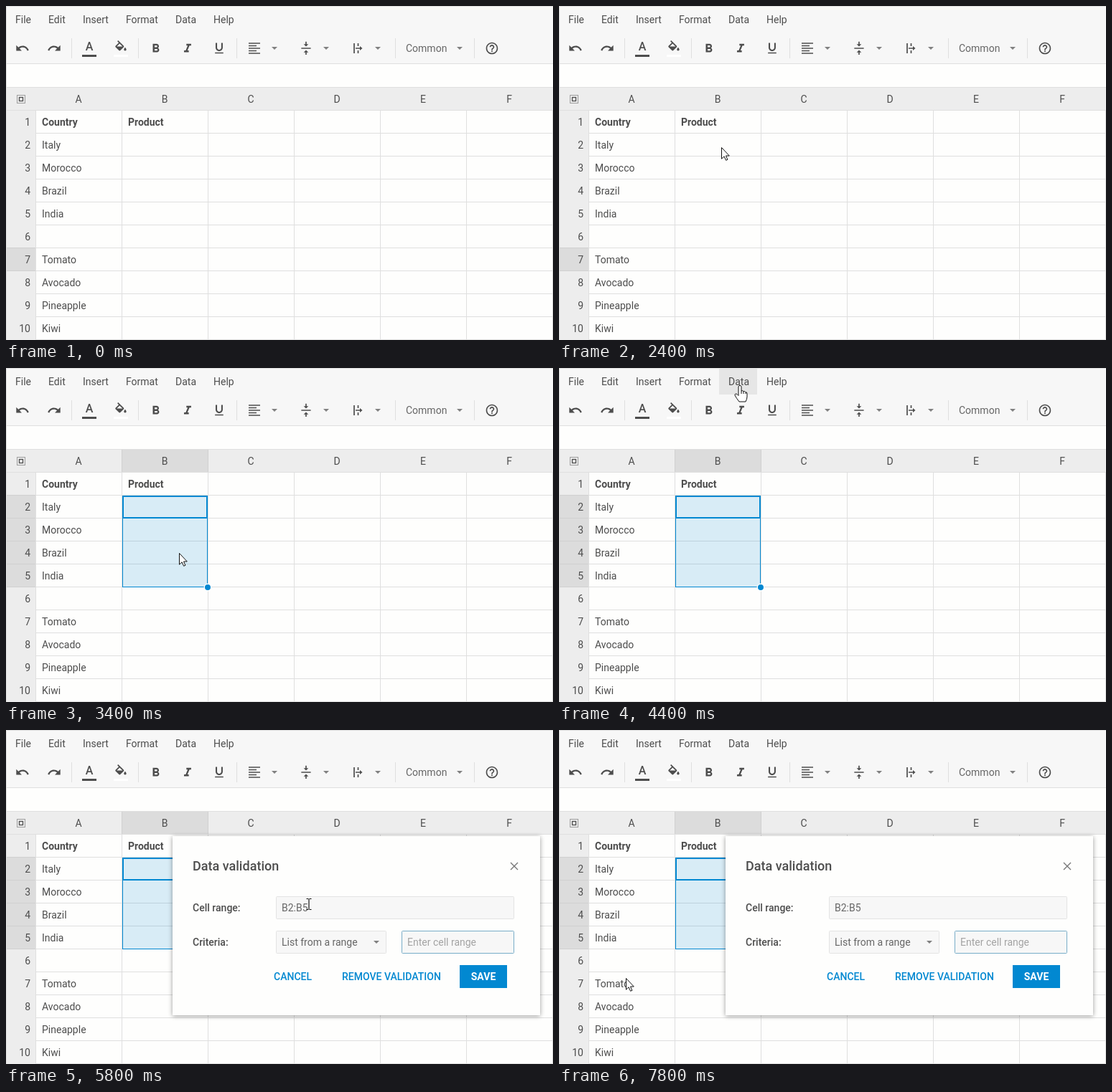
These frames come from a looping animation (762 by 466 pixels, 8 s). An HTML page:

```html
<!DOCTYPE html>
<html lang="en">
<head>
<meta charset="utf-8">
<title>Spreadsheet data validation</title>
<style>
  html, body { margin: 0; width: 100%; height: 100%; overflow: hidden; background: #fefefd; }
  svg { display: block; width: 762px; height: 466px; font: 14px Roboto, sans-serif; fill: #4d4d4d; }
  .medium { font-weight: 500; }
  .bold { font-weight: 700; }
  .blue { fill: #0288d1; }
  .field { fill: #f7f7f7; stroke: #e3e3e3; }
  .line { fill: none; stroke: #dfdfdf; }
  .edge { fill: none; stroke: #0288d1; }
  .pointer { fill: #fff; stroke: #111; stroke-linejoin: round; }
</style>
</head>
<body>
<svg viewBox="0 0 762 466">
  <rect width="762" height="81" fill="#f7f7f7"/>
  <rect id="menuHover" x="223" y="1" width="53" height="36" fill="#e6e6e6"/>
  <g id="menu"></g>

  <g id="toolbar">
    <path class="line" d="M91.5 45v28M184.5 45v28M321.5 45v28M542.5 45v28M652.5 45v28"/>
    <path id="undo" transform="translate(12.6 48.8) scale(.85)" d="M12.5 8c-2.65 0-5.05.99-6.9 2.6L2 7v9h9l-3.62-3.62c1.39-1.16 3.16-1.88 5.12-1.88 3.54 0 6.55 2.31 7.6 5.5l2.37-.78C21.08 11.03 17.15 8 12.5 8z"/>
    <use href="#undo" transform="translate(90 0) scale(-1 1)"/>
    <text class="medium" x="116" y="62" font-size="16" text-anchor="middle">A</text>
    <rect x="106" y="68" width="20" height="3"/>
    <path transform="translate(149.8 48) scale(.85)" d="M16.56 8.94L7.62 0 6.21 1.41l2.38 2.38-5.15 5.15c-.59.59-.59 1.54 0 2.12l5.5 5.5c.29.29.68.44 1.06.44s.77-.15 1.06-.44l5.5-5.5c.59-.58.59-1.53 0-2.12zM5.21 10L10 5.21 14.79 10H5.21zM19 11.5s-2 2.17-2 3.5c0 1.1.9 2 2 2s2-.9 2-2c0-1.33-2-3.5-2-3.5z"/>
    <rect x="150" y="68" width="20" height="3" fill="#fff"/>
    <path transform="translate(198.7 49.5) scale(.83)" d="M15.6 10.79c.97-.67 1.65-1.77 1.65-2.79 0-2.26-1.75-4-4-4H7v14h7.04c2.09 0 3.71-1.7 3.71-3.79 0-1.52-.86-2.82-2.15-3.42zM10 6.5h3c.83 0 1.5.67 1.5 1.5s-.67 1.5-1.5 1.5h-3v-3zm3.5 9H10v-3h3.5c.83 0 1.5.67 1.5 1.5s-.67 1.5-1.5 1.5z"/>
    <path transform="translate(243 49.5) scale(.83)" d="M10 4v3h2.21l-3.42 8H6v3h8v-3h-2.21l3.42-8H18V4z"/>
    <path transform="translate(287 48.9) scale(.83)" d="M12 17c3.31 0 6-2.69 6-6V3h-2.5v8c0 1.93-1.57 3.5-3.5 3.5S8.5 12.93 8.5 11V3H6v8c0 3.31 2.69 6 6 6zm-7 2v2h14v-2H5z"/>
    <path d="M338 52h16M338 55.5h11M338 59h16M338 62.5h11M338 66h16" stroke="#4d4d4d" stroke-width="1.6"/>
    <path transform="translate(408 49) scale(.83)" d="M8 19h3v4h2v-4h3l-4-4-4 4zm8-14h-3V1h-2v4H8l4 4 4-4zM4 11v2h16v-2H4z"/>
    <path d="M485 52v14M490.5 52v4M490.5 62v4M487 59h7" stroke="#4d4d4d" stroke-width="1.7"/>
    <path d="M493 56l3.5 3-3.5 3z"/>
    <text x="557" y="64" fill="#666">Common</text>
    <path transform="translate(667 49) scale(.83)" d="M11 18h2v-2h-2v2zm1-16C6.48 2 2 6.48 2 12s4.48 10 10 10 10-4.48 10-10S17.52 2 12 2zm0 18c-4.41 0-8-3.59-8-8s3.59-8 8-8 8 3.59 8 8-3.59 8-8 8zm0-14c-2.21 0-4 1.79-4 4h2c0-1.1.9-2 2-2s2 .9 2 2c0 2-3 1.75-3 5h2c0-2.25 3-2.5 3-5 0-2.21-1.79-4-4-4z"/>
  </g>

  <path d="M0 113h762v33H42v320H0z" fill="#ededed"/>
  <g id="headerMarks" fill="#dcdcdc" stroke="#d0d0d0"></g>
  <path id="grid" class="line"/>
  <g fill="none" stroke="#4d4d4d">
    <rect x="15.5" y="124.5" width="11" height="11" stroke-dasharray="1 1"/>
    <rect x="18.5" y="127.5" width="5" height="5" stroke-width="1.3"/>
  </g>

  <g id="selection">
    <rect id="range" class="edge" x="162.5" y="178.5" width="118" style="fill:#0288d1;fill-opacity:.15"/>
    <rect class="edge" x="163" y="179" width="117" height="30" stroke-width="2"/>
    <circle id="handle" class="blue" cx="281" r="4.7" stroke="#fff" stroke-width="1.4"/>
  </g>
  <g id="cells"></g>

  <g id="dialog">
    <rect x="232" y="148" width="512" height="250" fill="#fefefd" style="filter:drop-shadow(0 1px 3px rgba(0,0,0,.4))"/>
    <text class="medium" x="260" y="196" font-size="18">Data validation</text>
    <path d="M703 185l10 10M713 185l-10 10" stroke="#777" stroke-width="1.4"/>
    <text class="medium" x="260" y="253">Cell range:</text>
    <rect class="field" x="376.5" y="232.5" width="331" height="31" rx="1"/>
    <text x="384" y="253" fill="#666">B2:B5</text>
    <text class="medium" x="260" y="301">Criteria:</text>
    <rect class="field" x="376.5" y="280.5" width="153" height="31" rx="1"/>
    <text x="384" y="301" fill="#666">List from a range</text>
    <rect x="551.5" y="280.5" width="156" height="31" rx="1" fill="#f7f7f7" stroke="#78adc8"/>
    <text x="559" y="301" fill="#a3a3a3">Enter cell range</text>
    <text class="medium blue" x="373" y="349">CANCEL</text>
    <text class="medium blue" x="468" y="349">REMOVE VALIDATION</text>
    <rect class="blue" x="632" y="328" width="66" height="32"/>
    <text class="bold" x="665" y="349" text-anchor="middle" fill="#fff">SAVE</text>
  </g>
  <g id="carets" fill="#808080"></g>

  <g id="cursor">
    <path id="arrow" class="pointer" d="M.5.5v15.7l3.6-3.4 2.5 5.5 2.3-1-2.4-5.3h4.8z"/>
    <path id="hand" class="pointer" d="M-2 1.5Q0-1 2 1.5V8Q4 6.8 5 8.7Q7 7.7 8 9.8Q10 9.3 10 12V16Q10 19 8 23H-1Q-5 18-7 14Q-7 11-4 12.5L-2 14.5ZM2 8v4M5 9v3M8 10v2"/>
    <path id="beam" fill="none" stroke="#111" stroke-width="1.2" d="M-3.5-7.5h3M.5-7.5h3M0-7V7M-3.5 7.5h3M.5 7.5h3"/>
  </g>
</svg>

<script>
const LOOP = 8000, STEP = 200;
const SELECT_AT = 2600, DIALOG_AT = 5200;
const $ = id => document.getElementById(id);
const label = (x, y, text, attrs = '') => `<text x="${x}" y="${y}" ${attrs}>${text}</text>`;
const show = (id, visible) => $(id).style.display = visible ? '' : 'none';

$('menu').innerHTML = [['File', 13], ['Edit', 59], ['Insert', 107], ['Format', 167], ['Data', 236], ['Help', 289]]
  .map(([text, x]) => label(x, 24, text)).join('');

const caret = (x, y) => `<path d="M${x - 4} ${y}h8l-4 4z"/>`;
$('toolbar').innerHTML += `<g fill="#808080">${[374, 446, 518, 632].map(x => caret(x, 57)).join('')}</g>`;
$('carets').innerHTML = caret(516, 294);

let lines = 'M.5 466V.5H762M0 80.5H762M0 113.5H762M0 145.5H762';
for (let i = 0; i < 7; i++) lines += `M${41.5 + 120 * i} 145V466`;
for (let i = 1; i <= 10; i++) lines += `M41 ${145.5 + 32 * i}H762`;
$('grid').setAttribute('d', lines);

const firstColumn = ['Country', 'Italy', 'Morocco', 'Brazil', 'India', '', 'Tomato', 'Avocado', 'Pineapple', 'Kiwi'];
$('cells').innerHTML =
  [...'ABCDEF'].map((letter, i) => label(101 + 120 * i, 135, letter, 'text-anchor="middle"')).join('') +
  firstColumn.map((text, i) => {
    const y = 167 + 32 * i;
    return label(34, y, i + 1, 'text-anchor="end"') + label(50, y, text, i ? '' : 'class="bold"');
  }).join('') + label(170, 167, 'Product', 'class="bold"');

// time, x, y
const path = [
  [1400, 66, 440], [1600, 75, 371], [2000, 150, 272], [2400, 226, 197], [2600, 232, 194],
  [2800, 241, 279], [3000, 241, 285], [3400, 241, 258], [3600, 241, 240], [4000, 252, 23],
  [4800, 252, 25], [5000, 259, 52], [5200, 290, 95], [5800, 422, 243],
  [6200, 600, 297], [6800, 600, 297], [7400, 200, 335], [7800, 93, 346]
];

function cursorAt(t) {
  const next = path.findIndex(p => p[0] > t);
  if (next < 0) return path.at(-1).slice(1);
  const [t0, x0, y0] = path[next - 1], [t1, x1, y1] = path[next];
  const k = (t - t0) / (t1 - t0);
  return [x0 + (x1 - x0) * k, y0 + (y1 - y0) * k];
}

function pointerShape(t, x, y) {
  if (t >= 4000 && t < DIALOG_AT) return 'hand';
  const inside = (left, right, top, bottom) => x > left && x < right && y > top && y < bottom;
  const overInput = t >= DIALOG_AT && (inside(376, 708, 232, 264) || inside(551, 708, 280, 312));
  return overInput ? 'beam' : 'arrow';
}

const rowMark = row => `<rect x=".5" y="${113.5 + 32 * row}" width="41" height="32"/>`;

function draw() {
  const t = Math.floor(performance.now() % LOOP / STEP) * STEP;

  const selected = t >= SELECT_AT;
  const lastRow = t < 2800 ? 2 : t < 3000 ? 4 : 5;
  show('selection', selected);
  if (selected) {
    $('range').setAttribute('height', 32 * (lastRow - 1) - 1);
    $('handle').setAttribute('cy', 146 + 32 * lastRow);
  }
  let marks = selected ? '<rect x="161.5" y="113.5" width="120" height="32"/>' : rowMark(7);
  if (selected) for (let row = 2; row <= lastRow; row++) marks += rowMark(row);
  $('headerMarks').innerHTML = marks;

  show('menuHover', t >= 4000 && t < DIALOG_AT);
  show('dialog', t >= DIALOG_AT);
  show('carets', t >= DIALOG_AT);

  show('cursor', t >= path[0][0]);
  if (t >= path[0][0]) {
    const [x, y] = cursorAt(t);
    const shape = pointerShape(t, x, y);
    for (const id of ['arrow', 'hand', 'beam']) show(id, id === shape);
    $('cursor').setAttribute('transform', `translate(${Math.round(x)} ${Math.round(y)})`);
  }
  requestAnimationFrame(draw);
}
draw();
</script>
</body>
</html>
```
